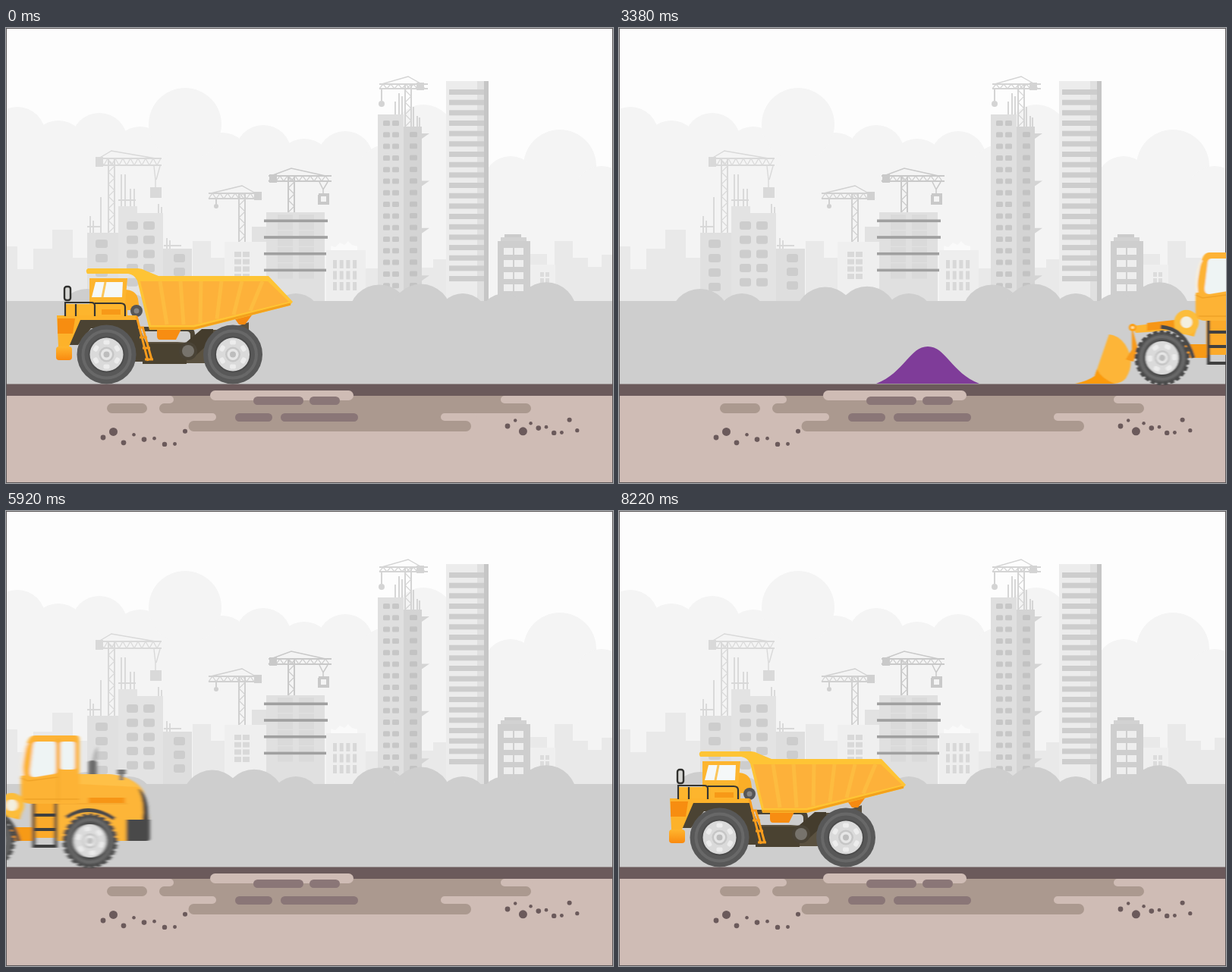
Recreate the animation shown at these times as an HTML page. Size 800x600 px, loop 8.24 s.

```html
<!DOCTYPE html>
<html lang="en">
<head>
<meta charset="utf-8">
<title>Construction site</title>
<style>
html, body { margin: 0; width: 100%; height: 100%; overflow: hidden; background: #fdfdfd; }
svg { display: block; width: 100%; height: 100%; }
</style>
</head>
<body>
<svg viewBox="0 0 800 600">
<defs>
  <filter id="truckBlur" filterUnits="userSpaceOnUse" x="-900" y="200" width="2600" height="300"><feGaussianBlur stdDeviation="0 0"/></filter>
  <filter id="loaderBlur" filterUnits="userSpaceOnUse" x="-900" y="200" width="2600" height="300"><feGaussianBlur stdDeviation="0 0"/></filter>
  <linearGradient id="bumper" x2="0" y2="1"><stop offset="0" stop-color="#ffb62e"/><stop offset="1" stop-color="#f98a10"/></linearGradient>
</defs>
<rect width="800" height="600" fill="#fdfdfd"/>
<g id="city"></g>
<g id="ground"></g>
<rect x=".5" y=".5" width="799" height="599" fill="none" stroke="#5c585a"/>
<g id="pile" fill="#7f3c99"><path id="mound"/><path id="stream"/></g>

<g id="loader">
  <path d="M472 469Q489 465 497 459L516 404Q528 405 537 417Q552 440 538 462Q533 468 523 469Z" fill="#fdb537"/>
  <path d="M472 469Q489 465 497 459L500 450Q506 462 523 469Z" fill="#fb9b10"/>
  <path d="M546 394L554 423 548 440 538 437 546 424Z" fill="#f79a1a"/>
  <path d="M546 393L610 386 632 395 628 407 598 399 551 402Z" fill="#fdb532"/>
  <path d="M566 389L602 385V396L566 399Z" fill="#f79617"/>
  <circle cx="547" cy="395" r="5" fill="#fb9f16"/><circle cx="547" cy="395" r="2" fill="#ffe3a4"/>
  <path d="M594 417H648V435H594Z" fill="#f79a17"/>
  <path d="M644 380H683V431H644Z" fill="#fbaa2c"/>
  <path d="M678 347H746Q779 350 791 369Q799 389 798 420L770 435H678Z" fill="#fdb539"/>
  <path d="M707 347H746Q772 349 785 364L707 360Z" fill="#fec047"/>
  <path d="M785 366Q794 371 797 390L798 408H790Q794 387 785 366Z" fill="#3d3d3d"/>
  <path d="M769 407H800V431Q800 435 796 435H769Z" fill="#484848"/>
  <path d="M678 386H770" stroke="#f0a12b"/>
  <rect x="719" y="378" width="48" height="7" fill="#f79517"/>
  <path d="M724 334Q724 319 731 310V325L728 334Z" fill="#b4b4b4"/>
  <path d="M719 331Q724 326 730 331V347H719Z" fill="#6b6b6b"/>
  <path d="M757 341H768V347H765V355H760V347H757Z" fill="#757575"/>
  <circle cx="618" cy="388" r="15" fill="#f3efdf"/><circle cx="618" cy="388" r="12" fill="none" stroke="#fcbd3a" stroke-width="8.5"/>
  <path d="M648 296H702Q707 296 707 301V380Q707 386 701 386H642Q630 385 630 376V352L637 310Q640 296 648 296Z" fill="#fdb334"/>
  <path d="M638 306Q629 323 632 349" fill="none" stroke="#f6eede" stroke-width="3"/>
  <path d="M651 304H672Q676 304 676 309V343Q676 346 672 347L648 351Q641 351 642 342L646 309Q647 304 651 304Z" fill="#eef4f4"/>
  <rect x="682" y="304" width="19" height="37" rx="4" fill="#eef4f4"/>
  <path d="M679 300V384M630 352L639 356 678 351M634 380H707" fill="none" stroke="#f0a228" stroke-width="1.4"/>
  <path d="M647 386V444M676 386V444M645 401H678M645 420H678M645 442H678" stroke="#414141" stroke-width="4"/>
  <path d="M584 394Q616 396 627 435M690 404Q720 384 753 406" fill="none" stroke="#4a4a4a" stroke-width="5"/>
  <g class="wheel" data-x="586" data-y="435" data-r="36" data-tread="1"></g>
  <g class="wheel" data-x="721" data-y="435" data-r="36" data-tread="1"></g>
</g>

<g id="truck">
  <path d="M180 397H238Q246 397 246 405V418" fill="none" stroke="#4c4434" stroke-width="6"/>
  <path d="M180 414H226L240 415 258 398H290L320 388V404L290 442H180Z" fill="#5a5140"/>
  <path d="M180 416H238V443H180Z" fill="#4a4231"/>
  <path d="M238 414L250 432 273 411V397H258Z" fill="#443c2d"/>
  <circle cx="240" cy="426" r="12" fill="#4a4336"/><circle cx="240" cy="426" r="8" fill="#77736c"/>
  <path d="M86 384H172L194 440H164L150 396H112L95 418H84Z" fill="#4b4333"/>
  <path d="M156 345Q171 345 174 357L176 372H156Z" fill="#fbae27"/>
  <circle cx="172" cy="373" r="8" fill="#565656"/><circle cx="172" cy="373" r="3.5" fill="#858585"/>
  <path d="M110 330H160L157 365H110Z" fill="#fdb52f"/>
  <path d="M118 335H154L153 355H113Z" fill="#f5f8f8"/><path d="M131 335L127 355" stroke="#fbc65b" stroke-width="3"/>
  <path d="M78 364H153Q159 364 160 370V381H78Z" fill="#fdb52d"/>
  <rect x="126" y="371" width="25" height="7" fill="#f79918"/>
  <path d="M67 379H172L175 385H98L83 420H69Z" fill="#fdb22a"/>
  <path d="M68 383H91L88 403H68Z" fill="#f78d10"/>
  <rect x="66" y="420" width="21" height="18" rx="4" fill="url(#bumper)"/>
  <path d="M78 380V362H112Q117 362 117 366V380M92 364V380M117 363H151Q157 363 157 368V380" fill="none" stroke="#353532" stroke-width="2.2"/>
  <rect x="77" y="341" width="8" height="18" rx="3" fill="#d6d6d3" stroke="#30302e" stroke-width="2.4"/>
  <path d="M172 380L187 439M180 394L192 437M174 395H182M176 408H186M180 422H190M183 437H194" fill="none" stroke="#f99c1d" stroke-width="3"/>
  <g class="wheel" data-x="132.5" data-y="430.5" data-r="39"></g>
  <g class="wheel" data-x="299" data-y="430.5" data-r="39"></g>
  <g id="bed">
    <path d="M199 397H231L224 411H203Q199 411 199 406Z" fill="#f78d12"/>
    <path d="M302 384L326 376 315 391H307Z" fill="#f58a11"/>
    <path d="M108 317H174Q179 317 184 320L201 327H346L378 361 374 366 248 398H189L173 333Q169 325 161 324H107Q104 319 108 317Z" fill="#fec435"/>
    <path d="M177 334H345L373 361 247 392H191Z" fill="#fdb13a"/>
    <path id="ribs" fill="none" stroke="#fdbc40" stroke-width="5"/>
    <path d="M189 396H248L375 364" fill="none" stroke="#f3a11d" stroke-width="3"/>
  </g>
</g>
</svg>
<script>
const $ = id => document.getElementById(id);
const LOOP = 8240, FLOOR = 469;

// ---------- drawing helpers ----------
const times = (n, f) => Array.from({ length: n }, (_, i) => f(i)).join('');
const rect = (x, y, w, h, fill, r = 0) => `<rect x="${x}" y="${y}" width="${w}" height="${h}" rx="${r}" fill="${fill}"/>`;
const circle = (x, y, r, fill) => `<circle cx="${x}" cy="${y}" r="${r}" fill="${fill}"/>`;
const line = (d, color, w = 2, cap = 'butt') => `<path d="${d}" fill="none" stroke="${color}" stroke-width="${w}" stroke-linecap="${cap}"/>`;
const shape = (d, fill) => `<path d="${d}" fill="${fill}"/>`;
const block = (l, r, top, fill) => rect(l, top, r - l, 362 - top, fill);
const hump = (x, top, r, fill) => circle(x, top + r, r, fill);
const grid = (x, y, cols, rows, dx, dy, w, h, fill, r = 0) =>
  times(cols * rows, i => rect(x + i % cols * dx, y + Math.floor(i / cols) * dy, w, h, fill, r));

function crane(x, y, base, left, right, h, weight, color) {
  const web = `M${x - 4} ${base}` + times((base - y) / 8 | 0, i => `L${x + (i % 2 ? -4 : 4)} ${base - 8 * i - 8}`);
  const jib = `M${left} ${y + h}` + times((right - left) / 5 | 0, i => `L${left + 5 * i + 5} ${i % 2 ? y + h : y}`);
  return line(`M${x - 4} ${base}V${y}M${x + 4} ${base}V${y}M${left} ${y}H${right}M${left} ${y + h}H${right}`, color)
    + line(web + jib, color, 1.2)
    + line(`M${left + 3} ${y}L${x} ${y - 10}L${right - 8} ${y}`, color, 1.4)
    + rect(weight, y - 2, 10, h + 4, color);
}

const clouds = fill =>
  times(10, i => hump(15 + 54 * i, 104 + 4 * i + i % 2 * 14, 37, fill))
  + hump(236, 79, 48, fill) + hump(550, 101, 42, fill) + hump(730, 134, 48, fill)
  + hump(665, 169, 36, fill) + hump(785, 182, 36, fill)
  + rect(0, 170, 630, 192, fill) + rect(630, 200, 170, 162, fill);

function bushes(fill) {
  const one = i => {
    const gap = i % 4 === 2 && i < 8, big = i % 4 % 3 === 0;
    return gap ? '' : hump(107 + 55 * i, big ? 344 - .8 * i : 350, big ? 40 : 33, fill);
  };
  return times(12, one) + rect(0, 360, 800, 112, fill);
}

const leftSite = () =>
  line('M111 248V270M115 254V270M125 223V270M107 262H126M152 193V236M157 193V236M164 212V236M169 212V236M148 227H171M201 232V246M205 236V246M212 277V292M216 280V292M208 287H231', '#d8d8d8', 1.8)
  + crane(139, 172, 270, 119, 205, 9, 118, '#d9d9d9')
  + line('M195 182L197 200V210M203 182L198 200', '#d9d9d9', 1.4) + rect(190, 210, 15, 14, '#d9d9d9')
  + block(107, 148, 270, '#e0e0e0') + block(148, 207, 244, '#e3e3e3') + block(148, 173, 235, '#e3e3e3')
  + block(207, 245, 291, '#dedede')
  + grid(118, 279, 1, 4, 0, 19, 16, 11, '#cdcdcd', 3)
  + grid(159, 255, 2, 5, 22, 18.7, 15, 11, '#cdcdcd', 3)
  + grid(221, 298, 1, 3, 0, 18, 15, 11, '#cdcdcd', 3);

const middleSite = () =>
  crane(311, 218, 282, 267, 337, 7, 327, '#d0d0d0') + line('M277 225V232', '#d0d0d0') + circle(277, 235, 3, '#d0d0d0')
  + block(324, 345, 262, '#e2e2e2') + block(288, 344, 282, '#efefef')
  + grid(301, 295, 2, 4, 11, 9.7, 9, 7, '#d9d9d9')
  + crane(376, 195, 243, 346, 429, 7, 347, '#c9c9c9')
  + line('M413 203L418 213 424 203M418 212V219', '#c9c9c9', 1.5) + line('M412 220H424V231H413V220', '#c9c9c9', 4)
  + block(343, 420, 243, '#e0e0e0') + grid(358, 246, 2, 4, 28, 21.5, 20, 20, '#dadada')
  + grid(340, 252.5, 1, 4, 0, 21.7, 84, 3.6, '#a0a0a0')
  + shape('M428 294V287L434 289 440 283 446 286 451 281 456 286 463 288V294Z', '#fafafa')
  + block(422, 474, 293, '#eeeeee') + grid(431, 306, 4, 3, 8.7, 14.5, 5, 11, '#d8d8d8');

const towers = () =>
  crane(530, 74, 130, 492, 556, 6, 541, '#d4d4d4') + line('M495 80V96', '#d4d4d4') + circle(495, 100, 4, '#d4d4d4')
  + line('M513 97V115M518 86V115M522 90V115M537 104V130M542 116V130M545 118V130', '#d2d2d2', 1.8)
  + block(490, 524, 114, '#dfdfdf') + block(524, 548, 130, '#d4d4d4')
  + grid(497, 122, 2, 15, 12, 15.3, 9, 7, '#c7c7c7', 1.5)
  + grid(532, 137, 1, 14, 0, 15.3, 10, 7, '#c3c3c3', 1.5)
  + times(4, i => shape(`M548 ${139 + 62.4 * i}h10l-10 7Z`, '#d4d4d4'))
  + block(580, 630, 70, '#ececec') + block(621, 631, 70, '#e0e0e0') + block(630, 636, 70, '#c6c6c6')
  + grid(584, 81, 1, 19, 0, 13.67, 46, 7, '#cdcdcd')
  + block(690, 724, 312, '#efefef') + grid(704, 322, 2, 2, 7, 8, 5, 6, '#dcdcdc')
  + rect(657, 272, 22, 5, '#cbcbcb') + rect(652, 276, 34, 6, '#d2d2d2')
  + block(648, 691, 281, '#cecece') + grid(656, 290, 2, 4, 14, 16, 12, 9, '#eeeeee');

const skyline = () => shape('M0 362V288H15V318H36V291H61V266H88V303H108V362ZM246 362V281H270V303H290V362Z'
  + 'M474 362V317H491V362ZM548 362V316H563V305H582V362ZM690 362V298H713V312H723V281H747V303H767V315H785V299H800V362Z', '#e9e9e9');

const pebbles = (x, y, step, n, big, fill) =>
  times(n, i => circle(x + step * i, y - 9 * Math.sin(i * i), i === big ? 5.5 : 2.8 + .6 * Math.cos(3 * i), fill));

function ground() {
  const soil = '#cfbcb5', stain = '#ab998f', mauve = '#8a7677', dark = '#6b5a5b';
  const bars = (d, color, w) => line(d, color, w, 'round');
  return rect(0, 485, 800, 115, soil) + rect(210, 485, 454, 12, stain)
    + bars('M200 490H216M657 490H690', soil, 10)
    + bars('M139.5 501.5H179.5M208.5 501.5H685.5', stain, 13) + rect(262, 507, 326, 13, stain)
    + bars('M245 513H272M578 513H615', soil, 10) + bars('M247.5 525H606', stain, 14)
    + rect(0, 469.5, 800, 15.5, dark) + bars('M275.5 484.5H451.5', soil, 13)
    + bars('M331.5 491.5H386.5M405.5 491.5H434.5M307.5 513.5H345.5M367.5 513.5H458.5', mauve, 11)
    + pebbles(128, 540, 13.5, 9, 1, dark) + pebbles(661, 525, 10.2, 10, 2, dark);
}

function wheel({ r, tread }) {
  return (tread ? circle(0, 0, r - 2, '#565656') + `<circle r="${r - 2}" fill="none" stroke="#484848" stroke-width="4.5" stroke-dasharray="5.6 2.94"/>`
    : circle(0, 0, r, '#585858'))
    + `<circle r="${r - 8}" fill="none" stroke="#686868" stroke-width="4"/>`
    + circle(0, 0, 24, '#4c4c4c') + circle(0, 0, 22, '#dadada')
    + times(6, i => `<rect x="-4" y="-19" width="8" height="6" rx="2" fill="#ececec" transform="rotate(${60 * i})"/>`)
    + circle(0, 0, 10, '#c6c6c6') + circle(0, 0, 7.5, '#e6e6e6') + circle(0, 0, 4, '#bdbdbd');
}

// ---------- motion ----------
const span = (t, a, b) => Math.min(1, Math.max(0, (t - a) / (b - a)));
const ease = (t, a, b) => { const p = span(t, a, b); return p * p * (3 - 2 * p); };
const mix = (a, b, k) => a.map((v, i) => v + (b[i] - v) * k);

const truckX = t => t < 5000 ? -846 * ease(t, 2400, 4500) : 846 * (1 - ease(t, 6020, 8120));
const pushX = t => -852 * ease(t, 4760, 6550);
const loaderX = t => 362 * (1 - ease(t, 2500, 3980)) + pushX(t);
const bedAngle = t => 29.8 * (ease(t, 40, 1120) - ease(t, 2140, 3200));

function drawPile(t) {
  const grow = span(t, 700, 780) * (.4 + .6 * span(t, 780, 2060) ** 1.3);
  const cx = 407, w = 68 * grow, h = 49 * grow, top = FLOOR - h;
  $('mound').setAttribute('d', `M${cx - w} ${FLOOR}C${cx - .45 * w} ${FLOOR - .3 * h} ${cx - .35 * w} ${top} ${cx} ${top}`
    + `C${cx + .35 * w} ${top} ${cx + .45 * w} ${FLOOR - .3 * h} ${cx + w} ${FLOOR}Z`);

  // The stream's head drops from the bed's lip, later its tail follows.
  const head = span(t, 480, 760) ** 1.5, tail = ease(t, 2060, 2420);
  const edge = (lip, bend, land) => [mix(lip, land, tail), mix(lip, mix(bend, land, tail), head), mix(lip, land, head)];
  const [a, b, c] = edge([377, 372], [404, 392], [cx + .27 * w, FLOOR - .82 * h]);
  const [d, e, f] = edge([380, 396], [394, 409], [cx - .27 * w, FLOOR - .8 * h]);
  $('stream').setAttribute('d', `M${a}Q${b} ${c}L${f}Q${e} ${d}Z`);

  $('pile').setAttribute('visibility', t > 480 && t < 6200 ? 'visible' : 'hidden');
  $('pile').setAttribute('transform', `translate(${pushX(t)} 0)`);
}

function place(id, pos, t) {
  const g = $(id), x = pos(t), speed = Math.abs(pos(t + 5) - pos(t - 5)) / 10;
  g.setAttribute('visibility', Math.abs(x) > 845 ? 'hidden' : 'visible');
  g.setAttribute('transform', `translate(${x} 0)`);
  if (speed > .06 && speed < 2) {
    $(id + 'Blur').firstChild.setAttribute('stdDeviation', `${speed * 3.6} 0`);
    g.setAttribute('filter', `url(#${id}Blur)`);
  } else g.removeAttribute('filter');
  for (const el of g.querySelectorAll('.wheel')) {
    const { x: cx, y: cy, r } = el.dataset;
    el.setAttribute('transform', `translate(${cx} ${cy}) rotate(${x / r * 180 / Math.PI})`);
  }
}

function draw(t) {
  place('truck', truckX, t);
  place('loader', loaderX, t);
  $('bed').setAttribute('transform', `rotate(${bedAngle(t)} 310 385)`);
  drawPile(t);
}

$('city').innerHTML = clouds('#f4f4f4') + skyline() + leftSite() + middleSite() + towers() + bushes('#cecece');
$('ground').innerHTML = ground();
document.querySelectorAll('.wheel').forEach(el => { el.innerHTML = wheel(el.dataset); });
$('ribs').setAttribute('d', times(6, i => `M${203 + i * 27} 334L${212 + i * 22} ${391 - Math.max(0, i - 1.6) * 5.4}`));

const start = performance.now();
function tick() {
  draw((performance.now() - start) % LOOP);
  requestAnimationFrame(tick);
}
tick();
</script>
</body>
</html>
```
